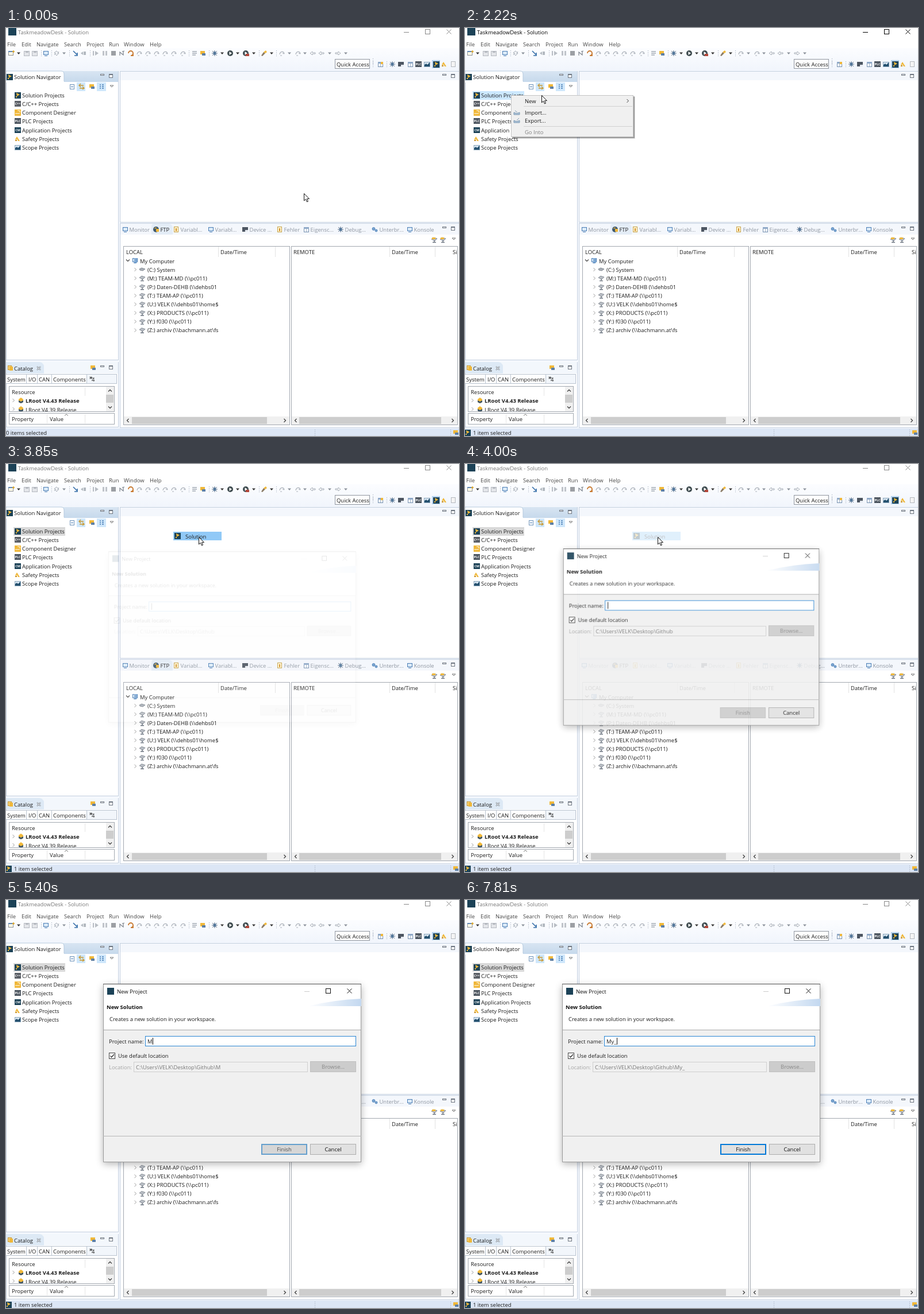
An HTML page with a canvas that plays this animation: 788x711 px, repeating every 8 s.

```html
<!DOCTYPE html>
<html lang="en">
<head>
<meta charset="utf-8">
<title>New solution</title>
<style>
html, body { margin: 0; width: 100%; height: 100%; overflow: hidden; background: #fff; }
canvas { display: block; }
</style>
</head>
<body>
<canvas id="stage" width="788" height="711"></canvas>
<script>
const stage = document.getElementById('stage');
const layer = stage.cloneNode();
const main = stage.getContext('2d'), side = layer.getContext('2d');
let c = main;
const LOOP = 8000;
const INK = '#1c1c1c', GREY = '#8d95a0', NAVY = '#1c4257', GOLD = '#f0b83a', BLUE = '#4a7db5', LINE = '#c3cfdf', FRAME = '#a2a8b0';

// ---- drawing helpers ----
function rect(x, y, w, h, fill, stroke) {
  if (fill) { c.fillStyle = fill; c.fillRect(x, y, w, h); }
  if (stroke) { c.lineWidth = 1; c.strokeStyle = stroke; c.strokeRect(x + .5, y + .5, w - 1, h - 1); }
}
function text(s, x, cy, color = INK, bold = false, align = 'left') {
  c.font = (bold ? 'bold ' : '') + '9.45px "Open Sans", "Noto Sans", sans-serif';
  c.textAlign = align;
  c.fillStyle = color;
  c.fillText(s, x, cy + 3.5);
}
function shape(x, y, d, fill, stroke, width = 1) {
  const p = new Path2D(d);
  c.save();
  c.translate(x, y);
  if (fill) { c.fillStyle = fill; c.fill(p); }
  if (stroke) { c.strokeStyle = stroke; c.lineWidth = width; c.stroke(p); }
  c.restore();
}
// Draws onto a separate layer, so that overlapping parts fade and scale as one.
function faded(alpha, draw, scale = 1, cx = 0, cy = 0) {
  if (alpha <= 0) return;
  side.clearRect(0, 0, 788, 711);
  c = side;
  draw();
  c = main;
  c.save();
  c.globalAlpha = Math.min(1, alpha);
  c.translate(cx, cy);
  c.scale(scale, scale);
  c.drawImage(layer, -cx, -cy);
  c.restore();
}
function vertical(y0, y1, a, b) {
  const g = c.createLinearGradient(0, y0, 0, y1);
  g.addColorStop(0, a);
  g.addColorStop(1, b);
  return g;
}
function tag(x, y, s, fill) {
  rect(x - 5, y - 5, 11, 10, fill);
  c.font = 'bold 5.5px "Open Sans", sans-serif';
  c.textAlign = 'center';
  c.fillStyle = '#fff';
  c.fillText(s, x + .5, y + 2);
}

// ---- icons, centred on x, y ----
const drop = (x, y, col = '#444') => shape(x, y, 'M-3-1.5H3L0 2z', col);
const chevron = (x, y, col = '#999') => shape(x, y, 'M-1.5-3L1.5 0-1.5 3', null, col);
const dots = (x, y) => { for (let i = -5; i < 6; i += 3) rect(x, y + i, 1, 1, '#9aa5b5'); };
const icons = {
  project(x, y) { rect(x - 5, y - 5, 11, 11, NAVY); shape(x, y, 'M-2-4L4-1-1 2zM-3 2h2v2h-2z', GOLD); },
  component(x, y) { rect(x - 5, y - 5, 11, 11, GOLD); shape(x, y, 'M-4 2H4M0-3H4V0', null, '#fff'); },
  safety(x, y) { shape(x, y, 'M-4 1L-1-4 4 4H1L-1 0-2 2z', GOLD); shape(x, y, 'M-4 2h3v2h-3z', '#c9922a'); },
  scope(x, y) { rect(x - 5, y - 4, 11, 9, '#d8e6f2', '#8aa5ba'); shape(x, y, 'M-4 4V1L-1-1 1 1 5-3V4z', '#24506e'); },
  screen(x, y, col = BLUE) { rect(x - 4, y - 4, 9, 7, '#dcebf8', col); rect(x - 2, y + 4, 5, 1, col); },
  dark(x, y) { rect(x - 5, y - 4, 10, 8, '#4d5662'); rect(x, y + 1, 5, 3, '#e6eaf0'); },
  table(x, y) { rect(x - 4, y - 4, 9, 9, '#fff', '#7590b0'); rect(x - 4, y - 4, 9, 3, '#8fa9c8'); rect(x, y - 1, 1, 5, '#9fb2c9'); },
  note(x, y) { rect(x - 4, y - 5, 8, 10, '#fff3cf', '#c6a24a'); rect(x - 1, y - 2, 2, 5, '#d28f25'); },
  bug(x, y) { shape(x, y, 'M-4-4L4 4M4-4L-4 4M-5 0H5M0-5V5', null, '#60738a'); shape(x, y, 'M-2.5 0a2.5 3 0 1 0 5 0a2.5 3 0 1 0-5 0', '#54789b'); },
  gears(x, y) { shape(x, y, 'M-5-1a2.5 2.5 0 1 0 5 0a2.5 2.5 0 1 0-5 0M0 2a2 2 0 1 0 4 0a2 2 0 1 0-4 0', '#7ba5d0', BLUE, .8); },
  globe(x, y) { shape(x, y, 'M-5 0a5 5 0 1 0 10 0a5 5 0 1 0-10 0', '#3d5870'); shape(x, y, 'M0-1H5V4H0zM-4-1L0-4 1-2z', GOLD); },
  flag(x, y) { rect(x - 5, y - 4, 8, 6, GOLD); rect(x - 2, y, 6, 4, '#5d7fa6'); },
  disk(x, y) { rect(x - 5, y - 4, 10, 9, '#e4e6ea', '#b5b9c0'); rect(x - 2, y - 4, 5, 3, '#b5b9c0'); },
  list(x, y) { shape(x, y, 'M-4-3H4M-4 0H4M-4 3H2', null, '#77808c'); },
  link(x, y) { shape(x, y, 'M-4 3L-1-1M4-3L1 1M-4-1L0-4 4 0 0 4z', null, '#a0a7b1'); },
  step(x, y) { shape(x, y, 'M-4 2C-3-4 3-4 4 1M4 1L1 0M-3 4H0', null, '#aab0b8', 1.2); },
  back(x, y) { shape(x, y, 'M-5 0L-1-3V-1H4V1H-1V3z', '#fff', '#a6adb7'); },
  forth(x, y) { shape(x, y, 'M5 0L1-3V-1H-4V1H1V3z', '#fff', '#a6adb7'); },
  torch(x, y) { shape(x, y, 'M-5 4L-1-2 2 0-3 5z', '#8a7b66'); shape(x, y, 'M-1-2L3-5 5-2 2 0z', GOLD); },
  run(x, y) { shape(x, y, 'M-5 0a5 5 0 1 0 10 0a5 5 0 1 0-10 0', '#3f4c50'); shape(x, y, 'M-1.5-3L3 0-1.5 3z', '#fff'); },
  drive(x, y) { shape(x, y, 'M-5-1L-1-4 5-2 1 2z', '#b9bec5', '#777e87', .8); shape(x, y, 'M0 1V4M-3 4.5H3', null, '#6d7681', 1.4); },
  cube(x, y) { shape(x, y, 'M-4-2L0-5 4-2V3L0 5-4 3z', GOLD); shape(x, y, 'M-4 0L0 2 4 0V3L0 5-4 3z', '#3c5468'); }
};
const put = (name, y, ...xs) => xs.forEach(x => icons[name](x, y));

function viewButtons(x, y) {
  rect(x - 3, y - 3, 7, 3, '#fff', '#6d7580');
  rect(x + 12, y - 3, 7, 7, '#fff', '#6d7580');
  rect(x + 12, y - 3, 7, 2, '#6d7580');
}
function windowButtons(x, y, gap, minCol, col) {
  rect(x - 4, y + 1, 9, 1, minCol);
  rect(x + gap - 4, y - 4, 9, 9, null, col);
  shape(x + 2 * gap + .5, y + .5, 'M-4-4L4 4M4-4L-4 4', null, col);
}

// ---- main window ----
function toolbar() {
  rect(0, 35, 788, 676, '#f5f8fd');
  rect(0, 35, 788, 39, vertical(35, 74, '#fcfdff', '#f1f5fc'));
  const y = 44;
  rect(4, 40, 9, 8, '#fffbe8', '#8d9098'); rect(4, 40, 9, 2, '#6488b4'); shape(13, 41, 'M-2 0H2M0-2V2', null, '#dca72d', 1.5);
  put('disk', y, 36, 50);
  put('screen', y, 69);
  put('link', y, 88);
  shape(121, y, 'M-4-4L3 3M3-1V4H-2', null, '#356da8', 1.6);
  shape(135, y, 'M-5 0L-1-3V3zM0-3h4v6h-4z', '#b3b9c0');
  shape(156, y, 'M-5-4h2v8h-2zM-1-4L5 0-1 4z', '#b8bdc4');
  shape(172, y, 'M-4-4h3v8h-3zM1-4h3v8h-3z', '#c0c4ca');
  rect(183, 40, 8, 8, '#9c9fa4');
  shape(202, y, 'M-4 4V-2L2 3V-4M0-3L4-4', null, '#7c838c', 1.2);
  shape(217, y, 'M-4 0A4 4 0 1 1 0 4M0 4H4V0', null, '#c8792f', 1.8);
  put('step', y, 232, 247, 262, 277, 292, 308);
  put('list', y, 328);
  put('flag', y, 343);
  put('bug', y, 363);
  put('run', y, 390, 417);
  rect(417, 45, 6, 4, '#b4473a');
  put('torch', y, 449);
  put('step', y, 480, 508);
  put('back', y, 534, 549);
  put('forth', y, 577);
  [22, 376, 403, 431, 462].forEach(x => drop(x, y, '#333'));
  [101, 493, 520, 563, 591].forEach(x => drop(x, y, '#8b929b'));
  [61, 79, 110, 146, 318, 353, 440, 470].forEach(x => dots(x, y));

  rect(572, 54, 61, 17, '#fff', '#8f959e');
  text('Quick Access', 575, 63);
  dots(638, 63); dots(638, 58); dots(662, 63);
  put('table', 63, 651, 703);
  rect(652, 59, 4, 4, GOLD);
  put('bug', 63, 672);
  put('dark', 63, 687);
  tag(717, 63, 'PLC', '#4b545e');
  put('scope', 63, 732);
  rect(741, 56, 14, 14, '#cfe4f8', '#a5c9ea');
  put('project', 63, 748);
  put('safety', 63, 762);
  rect(774, 58, 8, 10, '#f4f4f4', '#b4b8be');
}

function navigator(selection) {
  rect(0, 75, 196, 504, '#fff', LINE);
  rect(0, 75, 195, 19, vertical(75, 94, '#d8e5f2', '#c6d9ec'));
  shape(0, 75, 'M0 0H96Q101 0 101 6V19H0z', '#fff', '#b4c8dd');
  rect(0, 93, 101, 2, '#fff');
  put('project', 85, 6);
  text('Solution Navigator', 14, 85);
  viewButtons(167, 83);
  rect(123, 95, 15, 15, '#cfe7fb'); rect(158, 95, 16, 15, '#cfe7fb');
  rect(111, 98, 8, 9, '#fff', '#6f94bb'); rect(113, 102, 4, 1, BLUE);
  shape(131, 102, 'M4-2H-3M-1-5L-4-2-1 1M-3 3H4M2 0L5 3 2 5', null, '#c99a35', 1.4);
  put('flag', 102, 150);
  shape(166, 102, 'M-3-3h2M1-3H4M-3 0h2M1 0H4M-3 3h2M1 3H4', null, BLUE, 1.3);
  shape(184, 101, 'M-3-1H3L0 2z', '#fff', '#777');

  if (selection) rect(13, 110, 90, 15, selection);
  ['Solution Projects', 'C/C++ Projects', 'Component Designer', 'PLC Projects', 'Application Projects', 'Safety Projects', 'Scope Projects']
    .forEach((s, i) => text(s, 28, 117.5 + 15.15 * i));
  put('project', 117, 20);
  tag(20, 132, 'C++', '#5b5f66');
  put('component', 147, 20);
  tag(20, 162, 'PLC', '#4b545e');
  tag(20, 178, 'CM', NAVY);
  put('safety', 193, 20);
  put('scope', 208, 20);
}

function catalog() {
  rect(0, 582, 196, 114, '#fff', LINE);
  rect(0, 582, 195, 20, '#f3f7fc');
  shape(0, 582, 'M0 0H58Q63 0 66 6V20H0z', '#dde9f5');
  rect(3, 588, 7, 8, '#f5d27a', '#c99634'); rect(6, 590, 6, 7, GOLD);
  text('Catalog', 14, 593);
  shape(57, 593, 'M-3-3L3 3M3-3L-3 3', null, '#7d848d', 2);
  shape(57, 593, 'M-3-3L3 3M3-3L-3 3', null, '#fff', .8);
  put('flag', 592, 152);
  viewButtons(167, 591);
  rect(-1, 603, 194, 17, '#fff', '#b9c3cf');
  rect(141, 604, 51, 15, '#f2f6fb');
  [35, 54, 79, 140].forEach(x => rect(x, 603, 1, 17, '#b9c3cf'));
  text('System', 2, 612); text('I/O', 39, 612); text('CAN', 57, 612); text('Components', 82, 612);
  text('»', 145, 608, INK, true); text('4', 149, 612);

  text('Resource', 10, 634);
  rect(137, 626, 1, 15, '#e5e5e5');
  text('LRoot V4.43 Release', 34, 649.5, INK, true);
  text('LRoot V4.39 Release', 34, 665);
  [649, 664].forEach(y => { chevron(13, y); icons.cube(26, y); });
  rect(174, 625, 14, 43, '#f0f0f0'); rect(174, 639, 13, 14, '#cdcdcd');
  shape(181, 632, 'M-3 1.5L0-1.5 3 1.5', null, '#444', 1.3);
  shape(181, 661, 'M-3-1.5L0 1.5 3-1.5', null, '#444', 1.3);
  rect(1, 668, 190, 4, '#fff');
  rect(5, 624, 184, 45, null, FRAME);
  rect(5, 671, 184, 20, '#fff', FRAME);
  text('Property', 10, 681); text('Value', 76, 681);
  rect(71, 673, 1, 16, '#e5e5e5'); rect(137, 673, 1, 16, '#e5e5e5');
  shape(105, 674, 'M-3 1.5L0-1 3 1.5', null, '#777');
}

function scrollbar(x, w, thumbX, thumbW) {
  rect(x, 677, w, 14, '#f0f0f0');
  rect(thumbX, 678, thumbW, 12, '#cdcdcd');
  shape(x + 7, 684, 'M1.5-3L-1.5 0 1.5 3', null, '#444', 1.3);
  shape(x + w - 8, 684, 'M-1.5-3L1.5 0-1.5 3', null, '#444', 1.3);
}

function lowerViews() {
  rect(198, 75, 591, 264, '#fff', LINE);
  rect(199, 76, 589, 15, '#f4f7fc');
  viewButtons(762, 83);

  rect(198, 340, 591, 357, '#fff', LINE);
  rect(199, 341, 589, 19, '#f4f7fc');
  shape(253, 341, 'M0 19V5Q0 0 5 0H30Q35 0 37 6V19z', '#e4edf7');
  const tabs = [['screen', 207, 'Monitor'], ['globe', 261, 'FTP'], ['note', 296, 'Variabl...'], ['screen', 356, 'Variabl...'],
    ['dark', 416, 'Device ...'], ['note', 476, 'Fehler'], ['table', 522, 'Eigensc...'], ['bug', 582, 'Debug...'],
    ['gears', 642, 'Unterbr...'], ['screen', 702, 'Konsole']];
  tabs.forEach(([icon, x, label]) => {
    icons[icon](x, 351);
    text(label, x + 7.5, 351.5, label === 'FTP' ? INK : GREY);
  });
  viewButtons(762, 349);
  [745, 760].forEach(x => { icons.drive(x, 369); rect(x - 4, 365, 6, 3, GOLD); });
  shape(779, 367, 'M-3-1H3L0 2z', '#fff', '#777');

  rect(204, 380, 290, 312, '#fff', FRAME);
  rect(496, 380, 290, 312, '#fff', FRAME);
  [369, 468, 667, 746].forEach(x => rect(x, 381, 1, 18, '#e3e3e3'));
  text('LOCAL', 209, 390); text('Date/Time', 373, 390);
  text('REMOTE', 500, 390); text('Date/Time', 671, 390);
  c.save(); c.beginPath(); c.rect(770, 381, 15, 18); c.clip(); text('Size', 777, 390); c.restore();
  shape(212, 405, 'M-3-1.5L0 1.5 3-1.5', null, '#444', 1.2);
  icons.screen(224, 405); rect(223, 401, 5, 8, '#7fa9d4');
  text('My Computer', 233, 406);
  ['(C:) System', '(M:) TEAM-MD (\\\\pc011)', '(P:) Daten-DEHB (\\\\dehbs01', '(T:) TEAM-AP (\\\\pc011)', '(U:) VELK (\\\\dehbs01\\home$',
    '(X:) PRODUCTS (\\\\pc011)', '(Y:) f030 (\\\\pc011)', '(Z:) archiv (\\\\bachmann.at\\fs'].forEach((s, i) => {
    const y = 421 + 15.1 * i;
    chevron(225, y);
    if (i) icons.drive(237, y);
    else shape(237, y, 'M-5-1L-1-3 5-1 1 2-4 1z', '#a9afb7', '#777e87', .8);
    text(s, 246, y);
  });
  scrollbar(205, 288, 219, 235);
  scrollbar(497, 288, 510, 247);
}

function mainWindow(t) {
  const active = t >= 1380 && t < 3770;
  const control = active ? '#000' : '#888';
  rect(0, 0, 788, 711, '#fff');
  rect(4, 0, 14, 13, NAVY);
  text('TaskmeadowDesk - Solution', 21, 7, active ? '#000' : '#777');
  windowButtons(696, 6, 37, control, control);
  [['File', 2], ['Edit', 27], ['Navigate', 53], ['Search', 101], ['Project', 140], ['Run', 179], ['Window', 205], ['Help', 250]]
    .forEach(([s, x]) => text(s, x, 28, '#444'));
  toolbar();
  navigator(t < 680 ? null : t < 1380 ? '#e5f3ff' : active ? '#cce8ff' : '#d9d9d9');
  catalog();
  lowerViews();
  rect(0, 698, 788, 13, '#dce6f5');
  if (t < 1380) text('0 items selected', 0, 705);
  else { icons.project(4, 705); text('1 item selected', 14, 705); }
  dots(537, 705); dots(773, 705);
  icons.flag(783, 705);
}

// ---- popups ----
function popup(x, y, w, h) {
  rect(x + 3, y + 3, w, h, 'rgba(0,0,0,.12)');
  rect(x + 2, y + 2, w, h, 'rgba(0,0,0,.3)');
  rect(x, y, w, h, '#f0f0f0', '#c4c4c4');
}
function contextMenu(hover) {
  popup(80, 117, 213, 73);
  if (hover) rect(82, 120, 209, 14, '#91c9f7');
  text('New', 104, 127);
  chevron(283, 127, '#444');
  text('Import...', 104, 147);
  text('Export...', 104, 161.5);
  text('Go Into', 104, 181, '#808080');
  [136, 171].forEach(y => rect(102, y, 189, 1, '#d0d0d0'));
  shape(90, 147, 'M-5 4V0L0 2 5 0V4zM-3-3L1 0', '#a9c0d6', '#7f9bb5');
  shape(90, 161, 'M-5 4V0L0 2 5 0V4zM0 0L4-4', '#a9c0d6', '#7f9bb5');
}
function solutionItem(lit) {
  if (lit) rect(291, 118, 84, 15, '#91c9f7');
  icons.project(298, 125);
  text('Solution', 312, 126);
}
function button(x, y, label, fill, border, color) {
  rect(x, y, 80, 19, fill, border);
  text(label, x + 40, y + 9.5, color, false, 'center');
}

function dialog(t) {
  const name = t < 5250 ? '' : t < 5480 ? 'M' : t < 7810 ? 'My' : 'My_';
  c.save();
  c.shadowColor = 'rgba(0,0,0,.3)'; c.shadowBlur = 12; c.shadowOffsetY = 3;
  rect(169, 147, 449, 310, '#f0f0f0');
  c.restore();
  rect(169, 147, 449, 79, '#fff');
  rect(169, 226, 449, 1, '#a9a9a9');
  rect(169, 146, 449, 311, null, '#9a9a9a');
  rect(169, 146, 449, 1, '#555');
  rect(176, 153, 12, 12, NAVY);
  text('New Project', 193, 159, '#111');
  windowButtons(523, 158, 37, '#ccc', '#111');
  const wedge = c.createLinearGradient(525, 0, 618, 0);
  wedge.addColorStop(0, '#fff');
  wedge.addColorStop(1, '#c3d8f0');
  shape(0, 0, 'M525 185Q570 174 618 172V185z', wedge);
  text('New Solution', 175, 186.5, '#111', true);
  text('Creates a new solution in your workspace.', 180, 207);

  text('Project name:', 179, 246.5);
  rect(242, 237, 367, 18, '#fff', '#2a86d3');
  text(name, 246, 246.5);
  const caretOn = t < 4620 || t >= 5080 && t < 6170 || t >= 6720 && t < 7270 || t >= 7810;
  if (caretOn) rect(Math.round(246.5 + c.measureText(name).width), 240, 1, 12, '#111');

  rect(179, 266, 11, 11, '#fff', '#444');
  shape(184.5, 271.5, 'M-3 0L-1 2.5 3.5-2.5', null, '#222', 1.2);
  text('Use default location', 195, 271.5);
  text('Location:', 179, 291, '#a5a5a5');
  rect(222, 282, 303, 18, '#f0f0f0', '#cfcfcf');
  text('C:\\Users\\VELK\\Desktop\\Github' + (name && '\\' + name), 226, 291, '#777');
  button(529, 281, 'Browse...', '#cccccc', '#bfbfbf', '#888');
  rect(169, 411, 449, 1, '#b5b5b5');
  button(444, 425, 'Finish', '#cccccc', '#bfbfbf', '#888');
  button(529, 425, 'Cancel', '#e1e1e1', '#adadad', '#111');
}
function readyButton() {
  button(444, 425, 'Finish', '#e1e1e1', '#0078d7', '#111');
  rect(445, 426, 78, 17, null, '#0078d7');
}

// ---- pointer ----
// Progress 0..1 taken in n hard steps, the first at t0 and the last at t1.
function stepped(t, t0, t1, n) {
  if (t < t0) return 0;
  return Math.min(n, Math.floor((t - t0) / (t1 - t0) * (n - 1) + .1) + 1) / n;
}
const smooth = p => p * p * (3 - 2 * p);
const mix = (a, b, p) => a + (b - a) * p;

function pointerAt(t) {
  if (t < 1070) {
    const p = smooth(stepped(t, 80, 760, 10));
    return [mix(518, 80, p), mix(288, 122, p)];
  }
  if (t < 2840) {
    const p = stepped(t, 1990, 2760, 11);
    return [mix(80, 289, p ** 1.36), 117 + p + 10 * Math.max(0, Math.sin((p - .37) / .63 * Math.PI))];
  }
  const p = stepped(t, 2990, 3240, 4);
  return [mix(338, 335, p), mix(120, 127, p)];
}

function draw(t) {
  mainWindow(t);
  if (t < 3770) {
    faded(stepped(t, 1670, 1840, 3), () => contextMenu(t >= 2290));
    faded(stepped(t, 2600, 2760, 3), () => { popup(288, 116, 89, 19); solutionItem(t >= 2990); });
  }
  const rest = 1 - Math.min(1, Math.max(0, t - 3839) / 368);
  faded((t - 3832) / 190, () => dialog(t), 1 - .045 * rest ** 3, 393.5, 302);
  faded((t - 5250) / 310, readyButton);
  if (t >= 3770) faded((4055 - t) / 200, () => solutionItem(true));
  if (t < 5250) {
    const [x, y] = pointerAt(t);
    shape(Math.round(x) + .5, Math.round(y) + .5, 'M0 0V12.5L2.9 9.8 5 14.5 7 13.6 5 9.2H9z', '#fff', '#111');
  }
}

function tick(now) {
  draw(now % LOOP);
  requestAnimationFrame(tick);
}
requestAnimationFrame(tick);
</script>
</body>
</html>
```
